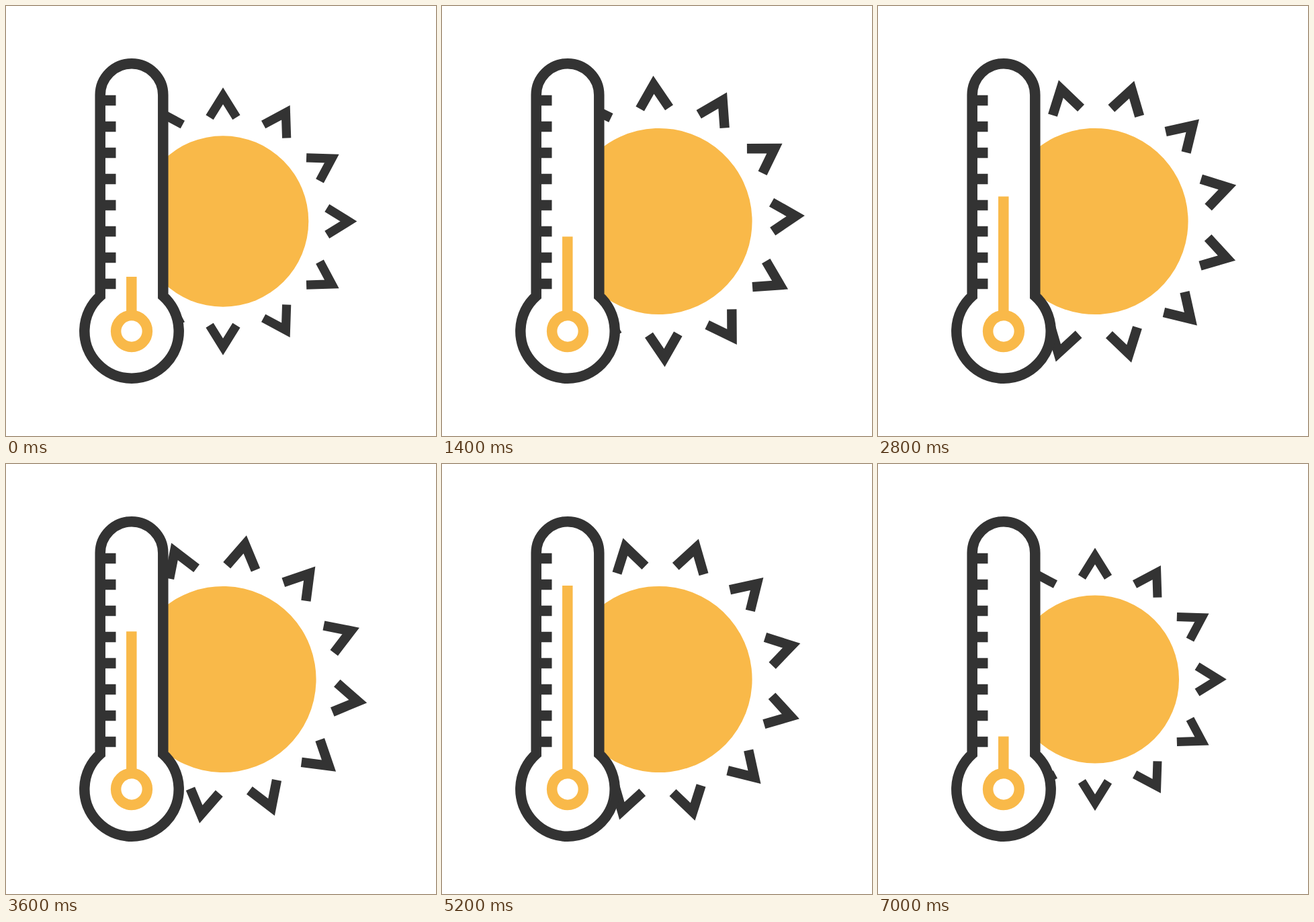
Animation, 640 px wide and 640 px high, one loop 7200 ms. Source, as an HTML page:

```html
<!DOCTYPE html>
<html lang="en">
<head>
<meta charset="utf-8">
<title>Thermometer and sun</title>
<style>
  html, body { margin: 0; height: 100%; overflow: hidden; background: #fff; }
  svg { display: block; width: 100vw; height: 100vh; }
</style>
</head>
<body>
<svg viewBox="0 0 640 640" fill="none" stroke="#333" stroke-width="15.5" stroke-miterlimit="10">
  <clipPath id="right"><rect x="187" width="453" height="640"/></clipPath>
  <g clip-path="url(#right)">
    <g id="sun" stroke-width="14.4">
      <circle r="138.6" fill="#f9b949" stroke="none"/>
    </g>
  </g>
  <path fill="#fff" d="M140.2 431.7V132.5a46.8 46.8 0 0 1 93.6 0V431.7A70.2 70.2 0 1 1 140.2 431.7Z"/>
  <path id="ticks"/>
  <g stroke="#f9b949">
    <path id="mercury"/>
    <circle cx="187" cy="484" r="23.4"/>
  </g>
</svg>
<script>
const LOOP = 7200, STEP = 200;
const SCALE_END = 1140, RESET = 6900;
// Swing of the sun: [ms, degrees]
const SWING = [[SCALE_END, 0], [3580, -21.2], [5300, 18], [6000, 10], [RESET, 0]];
const get = id => document.getElementById(id);
const sun = get('sun'), mercury = get('mercury');

for (let angle = 0; angle < 360; angle += 30) {
  const ray = document.createElementNS('http://www.w3.org/2000/svg', 'path');
  ray.setAttribute('d', 'M168.5 -21.7L203.4 0L168.5 21.7');
  ray.setAttribute('transform', `rotate(${angle})`);
  sun.append(ray);
}
get('ticks').setAttribute('d',
  Array.from({ length: 8 }, (_, i) => `M146 ${140.4 + 39 * i}H163.5`).join(''));

function swingAt(t) {
  const i = SWING.findIndex(([time]) => t < time);
  if (i < 1) return 0;
  const [t0, a0] = SWING[i - 1], [t1, a1] = SWING[i];
  return a0 + (a1 - a0) * (t - t0) / (t1 - t0);
}

function scaleAt(t) {
  const local = t >= RESET ? t - LOOP : t;
  return local < SCALE_END ? 1 - 0.1 * Math.cos(Math.PI * (local + 300) / 1520) : 1;
}

function draw(now) {
  const t = Math.floor(now % LOOP / STEP) * STEP;
  const level = t < RESET ? 403 - 0.0427 * t : 405.5;
  sun.setAttribute('transform',
    `translate(323 320.5) rotate(${swingAt(t)}) scale(${scaleAt(t)})`);
  mercury.setAttribute('d', `M186.8 ${level}V458`);
  requestAnimationFrame(() => draw(performance.now()));
}
draw(performance.now());
</script>
</body>
</html>
```
